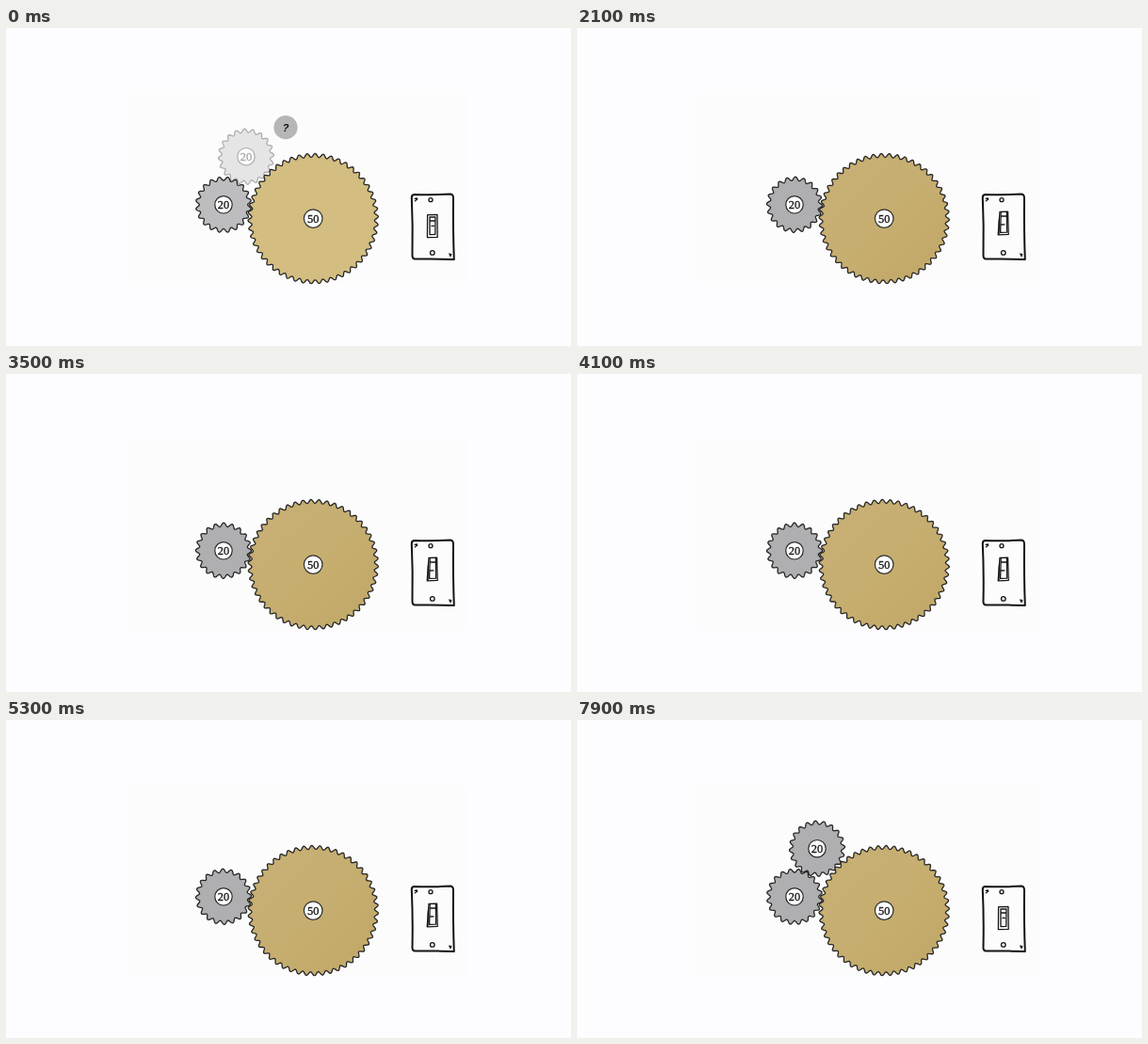
Write an HTML page that moves like this. It is 600 px wide and 338 px high and loops after 8 s.

```html
<!DOCTYPE html>
<html lang="en">
<head>
<meta charset="utf-8">
<title>Gears</title>
<style>
  html, body { margin: 0; width: 100%; height: 100%; overflow: hidden; background: #fdfcfe; }
  svg { display: block; width: 100vw; height: 100vh; }
  .ink { fill: none; stroke: #141414; stroke-width: 2; stroke-linejoin: round; stroke-linecap: round; }
  .thin { stroke-width: 1.3; }
  .edge { fill: none; stroke: #262626; stroke-width: 1.3; stroke-linejoin: round; }
  .num { font: 12.4px "Liberation Serif", serif; text-anchor: middle; fill: #1c1c1c; stroke: #1c1c1c; stroke-width: .35; }
  .ask { font: italic bold 11px "Liberation Sans", sans-serif; text-anchor: middle; fill: #111; }
</style>
</head>
<body>
<svg viewBox="0 0 600 338">
  <defs>
    <linearGradient id="gold" x1="0" y1="0" x2="1" y2="1">
      <stop offset="0" stop-color="#c8b077"/>
      <stop offset=".5" stop-color="#c6ae70"/>
      <stop offset="1" stop-color="#c1a766"/>
    </linearGradient>
    <clipPath id="panel"><rect x="127" y="69" width="364" height="203.5"/></clipPath>
  </defs>
  <rect x="127" y="69" width="364" height="203.5" fill="#fdfcfd"/>
  <g id="gears" clip-path="url(#panel)"></g>
  <g id="ask">
    <circle cx="297" cy="105.7" r="12.6" fill="#b6b6b7"/>
    <text class="ask" x="297" y="109.7">?</text>
  </g>
  <g class="ink">
    <path d="M433.5 177 Q452 177.8 472 176.6 Q475 176.8 475 181 Q474.6 215 475.8 246 Q455 245 434.5 245.6 Q431.2 245.4 431.5 241 Q432.2 210 430.8 180.5 Q430.6 177.2 433.5 177Z"/>
    <g class="thin">
      <circle cx="451" cy="182.7" r="2"/>
      <circle cx="452.8" cy="238.9" r="2.3"/>
      <path d="M434.2 181.4 436.4 181 M434.4 183.8 436.8 182 M470.8 240 472.8 240.6 472 242.6Z"/>
    </g>
  </g>
  <g id="off" class="ink thin">
    <path d="M447.6 198.7 458 198.4 458.2 222.4 447.4 222.6Z"/>
    <path d="M450 201 456 200.8 455.8 219.4 450 219.6Z M450 205 455.8 204.8 M452 210.4 454.4 210.4"/>
  </g>
  <g id="on" class="ink thin">
    <path d="M449 195.4 457.6 195.2 458.2 219.4 447.2 219.8Z"/>
    <path d="M450.2 196 449.6 217.4 456.6 217.2 456.4 196 M450 200 456.4 199.8 M450 209 454 208.8 M448.4 203 448 219"/>
  </g>
</svg>
<script>
const LOOP = 8000, NS = 'http://www.w3.org/2000/svg';
const $ = id => document.getElementById(id);
const ramp = (t, a, b) => Math.min(1, Math.max(0, (t - a) / (b - a)));
const pitch = teeth => teeth * 1.32 + 1.2;

function add(parent, tag, attrs, text) {
  const el = document.createElementNS(NS, tag);
  for (const k in attrs) el.setAttribute(k, attrs[k]);
  if (text) el.textContent = text;
  return parent.appendChild(el);
}

// Wave around the pitch circle, one crest per tooth
function outline(teeth) {
  const n = teeth * 12;
  let d = '';
  for (let i = 0; i < n; i++) {
    const a = i / n * 2 * Math.PI;
    const r = pitch(teeth) + 2 * Math.cos(a * teeth);
    d += (i ? 'L' : 'M') + (r * Math.cos(a)).toFixed(2) + ' ' + (r * Math.sin(a)).toFixed(2);
  }
  return d + 'Z';
}

function makeGear(x, y, teeth, hub, phase, rim, face, pale) {
  const g = add($('gears'), 'g', {}), d = outline(teeth);
  const wheel = add(g, 'g', {});
  add(wheel, 'path', { d, fill: rim });
  const light = add(wheel, 'path', { d, fill: pale });
  // The face stays still so its shading does not turn with the teeth
  const shade = add(g, 'circle', { r: pitch(teeth) - 2.3, fill: face });
  const edge = add(g, 'path', { d, class: 'edge' });
  add(g, 'circle', { r: hub, fill: '#fff', stroke: '#2a2a2a', 'stroke-width': 1.2 });
  add(g, 'text', { class: 'num', y: 4.1 }, String(teeth));
  return (turn, pale, opacity = 1, dx = 0, dy = 0) => {
    g.setAttribute('transform', `translate(${x + dx} ${y + dy})`);
    g.setAttribute('opacity', opacity);
    for (const el of [wheel, edge]) el.setAttribute('transform', `rotate(${phase + turn})`);
    light.setAttribute('opacity', pale);
    shade.setAttribute('opacity', 1 - pale);
  };
}

const extra = makeGear(255, 136.7, 20, 9.2, 14.4, '#afafb1', '#afafb1', '#bdbdbf');
const small = makeGear(231, 187.8, 20, 9.2, 9, '#afafb1', '#afafb1', '#bdbdbf');
const big = makeGear(326.2, 202.6, 50, 9.8, 192.6, '#c5ad70', 'url(#gold)', '#d3bd80');

// Degrees turned by the small wheel: short spin-up, steady run, short stop
function spin(t) {
  const start = 1650, end = 5950, soft = 250, run = end - start - soft;
  const s = Math.min(end - start, Math.max(0, t - start));
  const left = end - start - s;
  const dist = s < soft ? s * s / (2 * soft)
    : left < soft ? run - left * left / (2 * soft)
    : s - soft / 2;
  return 360 * dist / run;
}

function draw(t) {
  const pale = 1 - ramp(t, 650, 1050);
  const turn = spin(t);
  small(turn, pale);
  big(-turn * 0.4, pale);
  if (t < 7350) {
    extra(0, pale, 0.36 * pale);
  } else {
    const rest = (1 - ramp(t, 7350, 7900)) ** 2;
    extra(0, 0, ramp(t, 7350, 7550), -6 * rest, -33 * rest);
  }
  $('ask').setAttribute('opacity', pale);
  const on = t >= 1650 && t < 5750;
  $('on').setAttribute('opacity', on ? 1 : 0);
  $('off').setAttribute('opacity', on ? 0 : 1);
}

const begin = performance.now();
function tick() {
  draw((performance.now() - begin) % LOOP);
  requestAnimationFrame(tick);
}
tick();
</script>
</body>
</html>
```
